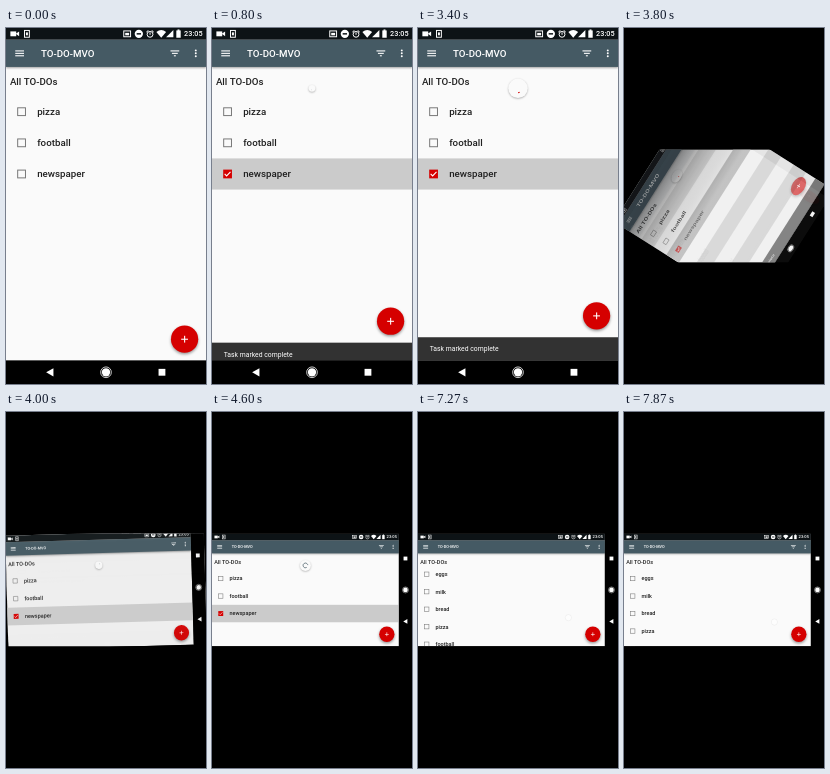
Write an HTML page with a canvas that moves like this. It is 200x356 px and loops after 8 s.

```html
<!DOCTYPE html>
<html lang="en">
<head>
<meta charset="utf-8">
<title>To-do list</title>
<style>
html, body { margin: 0; width: 100%; height: 100%; overflow: hidden; background: #000; }
canvas { display: block; width: 100vw; height: 100vh; }
</style>
</head>
<body>
<canvas></canvas>
<script>
const W = 200, H = 356, LOOP = 8000, FPS = 15;
const TALL = 200 / 411, WIDE = 200 / 731.4;   // pixels per dp
const WIDE_TOP = 121.7, WIDE_H = 112.6;
const canvas = document.querySelector('canvas');
const c = canvas.getContext('2d');
const SPIN_COLORS = ['#455a64', '#d50000', '#263238'];

const clamp = x => Math.max(0, Math.min(1, x));
const ramp = (t, a, b) => clamp((t - a) / (b - a));
const smooth = x => x * x * (3 - 2 * x);
const easeOut = x => 1 - (1 - x) ** 2;
const mix = (a, b, p) => a + (b - a) * p;

function rect(x, y, w, h, color) {
  c.fillStyle = color;
  c.fillRect(x, y, w, h);
}
function disc(x, y, r, color) {
  c.fillStyle = color;
  c.beginPath();
  c.arc(x, y, r, 0, 7);
  c.fill();
}
function ring(x, y, r, width, color, from = 0, to = 2 * Math.PI) {
  c.strokeStyle = color;
  c.lineWidth = width;
  c.beginPath();
  c.arc(x, y, r, from, to);
  c.stroke();
}
function poly(color, ...p) {
  c.fillStyle = color;
  c.beginPath();
  for (let i = 0; i < p.length; i += 2) c.lineTo(p[i], p[i + 1]);
  c.fill();
}
function text(s, x, y, size, color, weight = 400) {
  c.font = `${weight} ${size}px Roboto, sans-serif`;
  c.fillStyle = color;
  c.fillText(s, x, y + size * 0.355);
}
function shadow(blur, y, color, draw) {
  c.save();
  c.shadowBlur = blur;
  c.shadowOffsetY = y;
  c.shadowColor = color;
  draw();
  c.restore();
}

function statusBar(w) {
  const k = '#fff';
  rect(0, 0, w, 24, '#0d1316');
  rect(9, 7, 12, 10, k);
  poly(k, 20, 12, 27, 7, 27, 17);
  c.strokeStyle = k;
  c.lineWidth = 2;
  c.strokeRect(38, 5, 10, 14);
  rect(41, 9, 4, 6, k);
  // cast
  c.strokeRect(w - 169, 6, 14, 12);
  rect(w - 166, 10, 8, 5, k);
  // do not disturb
  disc(w - 138, 12, 8.5, k);
  rect(w - 142.5, 10.5, 9, 3, '#0d1316');
  // alarm
  ring(w - 115, 13, 6, 2, k);
  rect(w - 116, 9, 2, 5, k);
  poly(k, w - 123, 8, w - 119, 4, w - 118, 5.5, w - 122, 9);
  poly(k, w - 107, 8, w - 111, 4, w - 112, 5.5, w - 108, 9);
  // wifi, signal, battery
  poly(k, w - 92, 20, w - 102, 8, w - 97, 5, w - 92, 4, w - 87, 5, w - 82, 8);
  poly(k, w - 82, 19, w - 67, 19, w - 67, 4);
  rect(w - 61, 5, 9, 15, k);
  rect(w - 58.5, 3, 4, 3, k);
  text('23:05', w - 45, 12, 15, k, 500);
}

function checkbox(x, y, p) {
  if (p < 1) {
    c.strokeStyle = '#757575';
    c.lineWidth = 2;
    c.strokeRect(x - 8, y - 8, 16, 16);
  }
  if (!p) return;
  const r = 9 * p;
  rect(x - r, y - r, 2 * r, 2 * r, '#d50000');
  c.strokeStyle = '#fff';
  c.lineWidth = 2.2 * p;
  c.beginPath();
  c.moveTo(x - 6 * p, y);
  c.lineTo(x - 2 * p, y + 4 * p);
  c.lineTo(x + 6 * p, y - 4.5 * p);
  c.stroke();
}

function spinner(x, y, { age, scale, base }) {
  if (scale <= 0) return;
  const q = Math.max(0, age / 1333), n = Math.floor(q), p = q - n;
  const turn = base + 216 * q + 284 * n + 76 * p;
  const tail = 284 * smooth(clamp(p * 2 - 1)), head = 284 * smooth(clamp(p * 2)) + 12;
  const rad = a => (turn + a) * Math.PI / 180;
  c.save();
  c.translate(x, y);
  c.scale(scale, scale);
  shadow(2, 0.7, 'rgba(0,0,0,.3)', () => disc(0, 0, 20, '#fafafa'));
  ring(0, 0, 8.75, 2.6, SPIN_COLORS[n % 3], rad(tail), rad(head));
  c.restore();
}

// One app screen in dp; w and h leave out the navigation bar.
function app(w, h, bar, s) {
  const top = 24 + bar, mid = 24 + bar / 2, list = top + 60;
  rect(0, 0, w, h, '#fafafa');

  c.save();
  c.beginPath();
  c.rect(0, list, w, h - list);
  c.clip();
  s.items.forEach((name, i) => {
    const y = list + i * 64 - s.scroll, last = name === 'newspaper';
    if (last && s.done) rect(0, y, w, 64, '#cbcbcb');
    checkbox(32, y + 32, last ? s.check : 0);
    text(name, 64, y + 32, 20, '#212121', 500);
  });
  c.restore();

  text('All TO-DOs', 8, top + 31, 20, '#212121', 500);
  spinner(w / 2, top + 44, s.spin);
  shadow(2, 1, 'rgba(0,0,0,.35)', () => rect(0, 24, w, bar, '#455a64'));
  statusBar(w);
  for (const d of [-6, -1, 4]) rect(19, mid + d, 18, 2.2, '#fff');
  text('TO-DO-MVO', 72, mid, bar > 50 ? 20 : 14, '#fff', 500);
  [18, 12, 4].forEach((l, i) => rect(w - 64 - l / 2, mid - 6 + i * 5, l, 2.2, '#fff'));
  for (const d of [-6, 0, 6]) disc(w - 21, mid + d, 2, '#fff');

  const lift = 48 * s.snack, fx = w - 44, fy = h - 44 - lift;
  shadow(3, 1.5, 'rgba(0,0,0,.4)', () => disc(fx, fy, 28, '#d50000'));
  rect(fx - 7, fy - 1, 14, 2.2, '#fff');
  rect(fx - 1, fy - 7, 2.2, 14, '#fff');
  if (lift) {
    rect(0, h - lift, w, 48, '#323232');
    text('Task marked complete', 24, h - lift + 24, 14, '#fff');
  }
}

function navButtons(place) {
  const [bx, by] = place(-1), [hx, hy] = place(0), [rx, ry] = place(1);
  poly('#fff', bx - 8, by, bx + 7, by - 8.5, bx + 7, by + 8.5);
  ring(hx, hy, 11, 1.6, '#fff');
  disc(hx, hy, 8.5, '#fff');
  rect(rx - 7, ry - 7, 14, 14, '#fff');
}

function touch(x, y, alpha) {
  c.save();
  c.globalAlpha = alpha;
  disc(x, y, 12, 'rgba(255,255,255,.6)');
  ring(x, y, 11.5, 1.6, 'rgba(0,0,0,.1)');
  c.restore();
}

function tallScreen(t) {
  c.save();
  c.scale(TALL, TALL);
  rect(0, 0, 411, 732, '#000');
  app(411, 683.5, 56, {
    items: ['pizza', 'football', 'newspaper'],
    scroll: 0,
    check: smooth(ramp(t, 130, 400)),
    done: t >= 660,
    snack: easeOut(ramp(t, 660, 930)),
    spin: { age: t - 800, scale: ramp(t, 730, 930), base: 94 }
  });
  rect(0, 683.5, 411, 49, '#000');
  navButtons(k => [205.5 + k * 115, 707.5]);
  touch(188, 569, ramp(t, 1200, 1400) * (1 - ramp(t, 1470, 1730)));
  c.restore();
}

function wideScreen(t) {
  const fresh = t >= 6790;
  const slide = smooth(ramp(t, 7200, 7470)) - smooth(ramp(t, 7660, 7867));
  c.save();
  c.scale(WIDE, WIDE);
  c.beginPath();
  c.rect(0, 0, 731.4, 411.7);
  c.clip();
  rect(0, 0, 732, 412, '#000');
  app(683.4, 411.7, 48, {
    items: (fresh ? ['eggs', 'milk', 'bread'] : []).concat('pizza', 'football', 'newspaper'),
    scroll: 104 * slide,
    check: 1,
    done: true,
    snack: 0,
    spin: { age: t - 3930, scale: ramp(t, 3900, 4050) * (1 - ramp(t, 6790, 6960)), base: -90 }
  });
  rect(683.4, 0, 49, 412, '#000');
  navButtons(k => [707.5, 205.7 - k * 115]);
  touch(550, 323 - 104 * slide, t > 7200 && t < 7530 || t > 7660 ? 1 : 0);
  c.restore();
}

// Blended bands across the old screen while it turns.
function bands(alpha) {
  c.save();
  c.globalAlpha = alpha;
  const g = c.createLinearGradient(0, 40, 0, 150);
  g.addColorStop(0, 'rgba(0,0,0,.45)');
  g.addColorStop(0.6, 'rgba(128,128,128,.2)');
  g.addColorStop(1, 'rgba(255,255,255,.4)');
  rect(0, 39, W, 293, g);
  rect(0, 0, W, 39, 'rgba(0,0,0,.35)');
  for (let y = 69; y < 310; y += 62) rect(0, y, W, 31, 'rgba(0,0,0,.1)');
  c.restore();
}

function turning(t) {
  const p = t < 3790 ? 0 : easeOut(ramp(t, 3740, 4040));
  c.save();
  c.beginPath();
  c.rect(0, WIDE_TOP, W, WIDE_H);
  c.clip();
  c.translate(W / 2, H / 2);
  c.rotate((p - 1) * Math.PI / 2);
  c.scale(mix(0.565, 1, p), mix(0.565, WIDE_H / H, p));
  c.translate(-W / 2, -H / 2);
  tallScreen(3400);
  if (p) bands(Math.min(1, p * 2.8));
  c.globalAlpha = p * p * p;
  c.scale(1, H / WIDE_H);
  wideScreen(t);
  c.restore();
}

function frame(now) {
  const t = Math.floor((now % LOOP + 5) * FPS / 1000) * 1000 / FPS;
  const k = window.devicePixelRatio || 1;
  const w = Math.round(innerWidth * k), h = Math.round(innerHeight * k);
  if (canvas.width !== w || canvas.height !== h) {
    canvas.width = w;
    canvas.height = h;
  }
  c.setTransform(w / W, 0, 0, h / H, 0, 0);
  rect(0, 0, W, H, '#000');
  if (t < 3460) tallScreen(t);
  else if (t < 4040) turning(t);
  else {
    c.translate(0, WIDE_TOP);
    wideScreen(t);
  }
  requestAnimationFrame(() => frame(performance.now() - start));
}
const start = performance.now();
frame(0);
</script>
</body>
</html>
```
